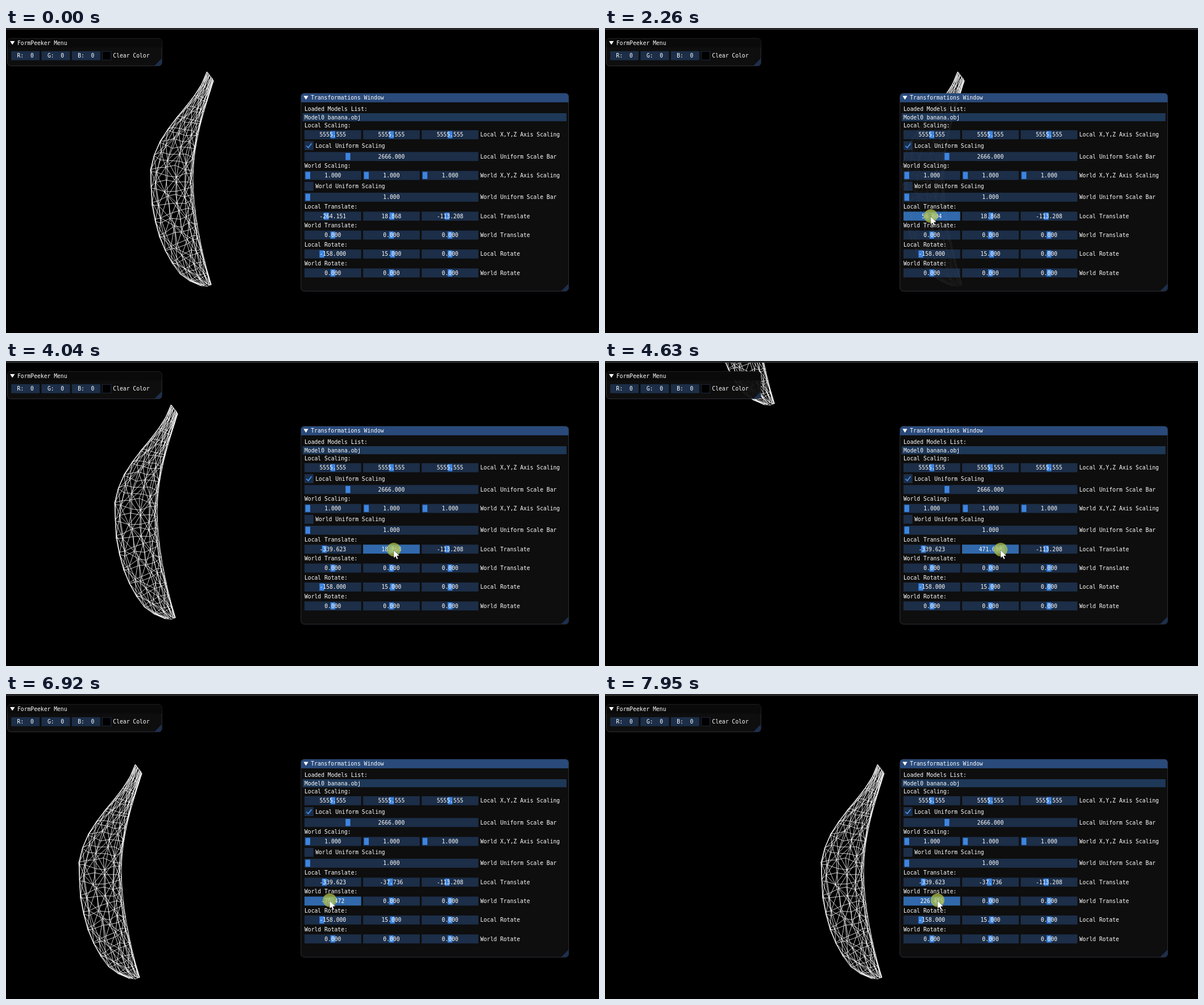
Animation, 1043 px wide and 537 px high, one loop 8000 ms. Source, as an HTML page with a canvas:

```html
<!DOCTYPE html>
<html lang="en">
<head>
<meta charset="utf-8">
<title>Mesh transformations</title>
<style>
html, body { margin: 0; height: 100%; overflow: hidden; background: #000; }
canvas { display: block; }
</style>
</head>
<body>
<canvas id="stage" width="1043" height="537"></canvas>
<script>
const ctx = document.getElementById('stage').getContext('2d');
const LOOP = 8000, LAG = 80;
const SCALE = 5 / 6;        // the interface is laid out in its own pixels, then scaled
const STEP = 1000 / 53;     // one slider pixel of a translate slider
const LINE = 17, ROW = 23, FRAME_H = 19;
const FRAME = 'rgba(41,74,122,.54)', ACTIVE = 'rgba(66,150,250,.67)';
const ITEM_X = 630, ITEM_W = 367, THIRD = (ITEM_W - 8) / 3;

// Slider drags; rest and path values count slider steps
const drags = {
  localX: { from: 1320, to: 2930, x: 575, y: 332, rest: -14,
    path: [[1320, -14], [1670, -9], [1920, 3], [2180, 5], [2600, -18]] },
  localY: { from: 3800, to: 5290, x: 678, y: 333, rest: 1,
    path: [[4040, 1], [4110, 5], [4240, -5], [4560, 26], [5160, -2]] },
  worldX: { from: 6720, to: LOOP, x: 575, y: 364, rest: 0,
    path: [[6720, -4], [6920, -4], [7200, -18], [7550, -15], [7930, 12]] },
};
// Pointer between the drags
const travel = [[70, 862, 481], [860, 564, 332], [2930, 560, 332], [3430, 679, 333],
  [5290, 677, 333], [5750, 576, 390], [6310, 571, 364]];

const ease = f => f * f * (3 - 2 * f);
function sample(keys, t) {
  const i = keys.findIndex(k => k[0] > t);
  if (i <= 0) return keys.at(i).slice(1);
  const a = keys[i - 1], b = keys[i], f = ease((t - a[0]) / (b[0] - a[0]));
  return a.slice(1).map((v, n) => v + (b[n + 1] - v) * f);
}
const isHeld = (d, t) => t >= d.from && t < d.to;
const dragValue = (d, t) => STEP * (t < d.from ? d.rest : Math.round(sample(d.path, t)[0]));

// Banana outline: two joined cubic curves per side
const leftEdge = [[353, 77], [333, 140], [252, 180], [252, 265], [252, 350], [285, 440], [341, 453]];
const rightEdge = [[365, 93], [350, 140], [329, 200], [329, 265], [329, 325], [345, 400], [361, 452]];

function along(edge, s) {
  const first = s < 0.5 ? 0 : 3, t = s * 2 - first / 3, u = 1 - t;
  const weights = [u * u * u, 3 * u * u * t, 3 * u * t * t, t * t * t];
  return [0, 1].map(axis => weights.reduce((sum, w, i) => sum + w * edge[first + i][axis], 0));
}

function buildMesh(rings, sides) {
  let seed = 11;
  const jitter = size => ((seed = seed * 16807 % 2147483647) / 2147483647 - 0.5) * size;
  const path = new Path2D();
  const line = (p, q) => { path.moveTo(...p); path.lineTo(...q); };
  const points = Array.from({ length: rings }, (_, i) => {
    const [lx, ly] = along(leftEdge, i / (rings - 1)), [rx, ry] = along(rightEdge, i / (rings - 1));
    const w = rx - lx;
    return Array.from({ length: sides }, (_, j) => {
      const a = j / sides * 2 * Math.PI, inner = Math.abs(Math.sin(a));
      const u = ((1 + Math.cos(a)) / 2) ** 0.85 + jitter(0.1 * inner);
      return [lx + w * u, ly + (ry - ly) * u + w * (Math.sin(a) * 0.09 + jitter(0.12 * inner))];
    });
  });
  points.forEach((ring, i) => ring.forEach((p, j) => {
    const k = (j + 1) % sides, next = points[i + 1];
    line(p, ring[k]);
    if (!next) return;
    line(p, next[j]);
    if ((i + j) % 2) line(p, next[k]); else line(ring[k], next[j]);
  }));
  return path;
}
const mesh = buildMesh(18, 13);

function rect(x, y, w, h, color) {
  ctx.fillStyle = color;
  ctx.fillRect(x, y, w, h);
}
function poly(color, ...pts) {
  ctx.fillStyle = color;
  ctx.beginPath();
  pts.forEach(p => ctx.lineTo(...p));
  ctx.closePath();
  ctx.fill();
}
function text(s, x, top, align = 'left') {
  ctx.fillStyle = '#fff';
  ctx.textAlign = align;
  ctx.fillText(s, x, top + 10.7);
}
function panel(x, y, w, h, title, titleColor) {
  ctx.save();
  ctx.beginPath();
  ctx.roundRect(x, y, w, h, 7);
  ctx.fillStyle = 'rgba(15,15,15,.94)';
  ctx.fill();
  ctx.strokeStyle = 'rgba(110,110,128,.5)';
  ctx.stroke();
  ctx.clip();
  rect(x, y, w, FRAME_H, titleColor);
  poly('#1d2f4d', [x + w, y + h - 16], [x + w, y + h], [x + w - 16, y + h]);
  ctx.restore();
  poly('#fff', [x + 5.5, y + 5.5], [x + 15.5, y + 5.5], [x + 10.5, y + 13.5]);
  text(title, x + 21, y + 3);
}
function slider(x, y, w, value, [min, max], held) {
  const grab = x + 2 + (w - 14) * (value - min) / (max - min);
  rect(x, y, w, FRAME_H, held ? ACTIVE : FRAME);
  rect(grab, y + 2, 10, FRAME_H - 4, held ? '#4296fa' : '#3d85e0');
  text(value.toFixed(3), x + w / 2, y + 3, 'center');
}

function drawMenu() {
  panel(3, 22, 326, 58, 'FormPeeker Menu', '#0a0a0a');
  ['R', 'G', 'B'].forEach((channel, i) => {
    rect(11 + i * 64, 49, 60, FRAME_H, FRAME);
    text(channel + ':  0', 41 + i * 64, 52, 'center');
  });
  rect(203, 49, FRAME_H, FRAME_H, '#000');
  ctx.strokeStyle = '#24334b';
  ctx.strokeRect(203.5, 49.5, FRAME_H - 1, FRAME_H - 1);
  text('Clear Color', 226, 52);
}

function drawTransforms(t, lx, ly, wx) {
  const scaleRange = [1, 11110], moveRange = [-1000, 1000], turnRange = [-360, 360];
  let y = 165;
  const heading = s => { text(s, ITEM_X, y); y += LINE; };
  const sliders = (label, values, range, held = []) => {
    const w = values.length > 1 ? THIRD : ITEM_W;
    values.forEach((v, i) => slider(ITEM_X + i * (w + 4), y, w, v, range, held[i]));
    text(label, ITEM_X + ITEM_W + 4, y + 3);
    y += ROW;
  };
  const checkbox = (label, checked) => {
    rect(ITEM_X, y, FRAME_H, FRAME_H, FRAME);
    if (checked) {
      ctx.beginPath();
      ctx.moveTo(ITEM_X + 4, y + 10);
      ctx.lineTo(ITEM_X + 8, y + 14);
      ctx.lineTo(ITEM_X + 15, y + 5);
      ctx.strokeStyle = '#4296fa';
      ctx.lineWidth = 2;
      ctx.stroke();
      ctx.lineWidth = 1;
    }
    text(label, ITEM_X + FRAME_H + 4, y + 3);
    y += ROW;
  };
  const scaling = (space, axes, uniform, checked) => {
    heading(space + ' Scaling:');
    sliders(space + ' X,Y,Z Axis Scaling', axes, scaleRange);
    checkbox(space + ' Uniform Scaling', checked);
    sliders(space + ' Uniform Scale Bar', [uniform], scaleRange);
  };
  const triple = (label, values, range, held) => {
    heading(label + ':');
    sliders(label, values, range, held);
  };

  panel(622.5, 138, 565, 418, 'Transformations Window', '#294a7a');
  heading('Loaded Models List:');
  rect(626, y - 2, 557, LINE, 'rgba(66,150,250,.31)');
  heading('Model0 banana.obj');
  scaling('Local', [5555.555, 5555.555, 5555.555], 2666, true);
  scaling('World', [1, 1, 1], 1, false);
  triple('Local Translate', [lx, ly, -6 * STEP], moveRange, [isHeld(drags.localX, t), isHeld(drags.localY, t)]);
  triple('World Translate', [wx, 0, 0], moveRange, [isHeld(drags.worldX, t)]);
  triple('Local Rotate', [-158, 15, 0], turnRange);
  triple('World Rotate', [0, 0, 0], turnRange);
}

function drawPointer(t) {
  if (t < travel[0][0]) return;
  const drag = Object.values(drags).find(d => isHeld(d, t));
  let [x, y] = sample(travel, t);
  if (drag) {
    // The slider value trails the pointer slightly
    x = drag.x + sample(drag.path, t + LAG)[0] * SCALE;
    y = drag.y;
    ctx.beginPath();
    ctx.arc(x, y - 1, 12, 0, 2 * Math.PI);
    ctx.fillStyle = 'rgba(180,196,70,.72)';
    ctx.fill();
  }
  poly('#fff', ...[[0, 0], [0, 14], [3, 11], [5.5, 16], [7.5, 15], [5.5, 10], [10, 10]]
    .map(([dx, dy]) => [x + dx, y + dy]));
  ctx.strokeStyle = 'rgba(0,0,0,.55)';
  ctx.lineWidth = 0.6;
  ctx.stroke();
}

function draw(t) {
  const [lx, ly, wx] = Object.values(drags).map(d => dragValue(d, t));
  rect(0, 0, 1043, 537, '#000');
  ctx.save();
  ctx.translate(Math.round((lx + wx + 14 * STEP) * SCALE), Math.round((STEP - ly) * SCALE));
  ctx.strokeStyle = '#fff';
  ctx.lineWidth = 0.8;
  ctx.stroke(mesh);
  ctx.restore();
  rect(0, 0, 1043, 1, '#111');
  rect(0, 1, 1043, 2, '#333');

  ctx.save();
  ctx.scale(SCALE, SCALE);
  ctx.font = '11.63px "DejaVu Sans Mono", monospace';
  ctx.lineWidth = 1;
  drawMenu();
  drawTransforms(t, lx, ly, wx);
  ctx.restore();
  drawPointer(t);
}

const start = performance.now();
function tick() {
  draw((performance.now() - start) % LOOP);
  requestAnimationFrame(tick);
}
tick();
</script>
</body>
</html>
```
